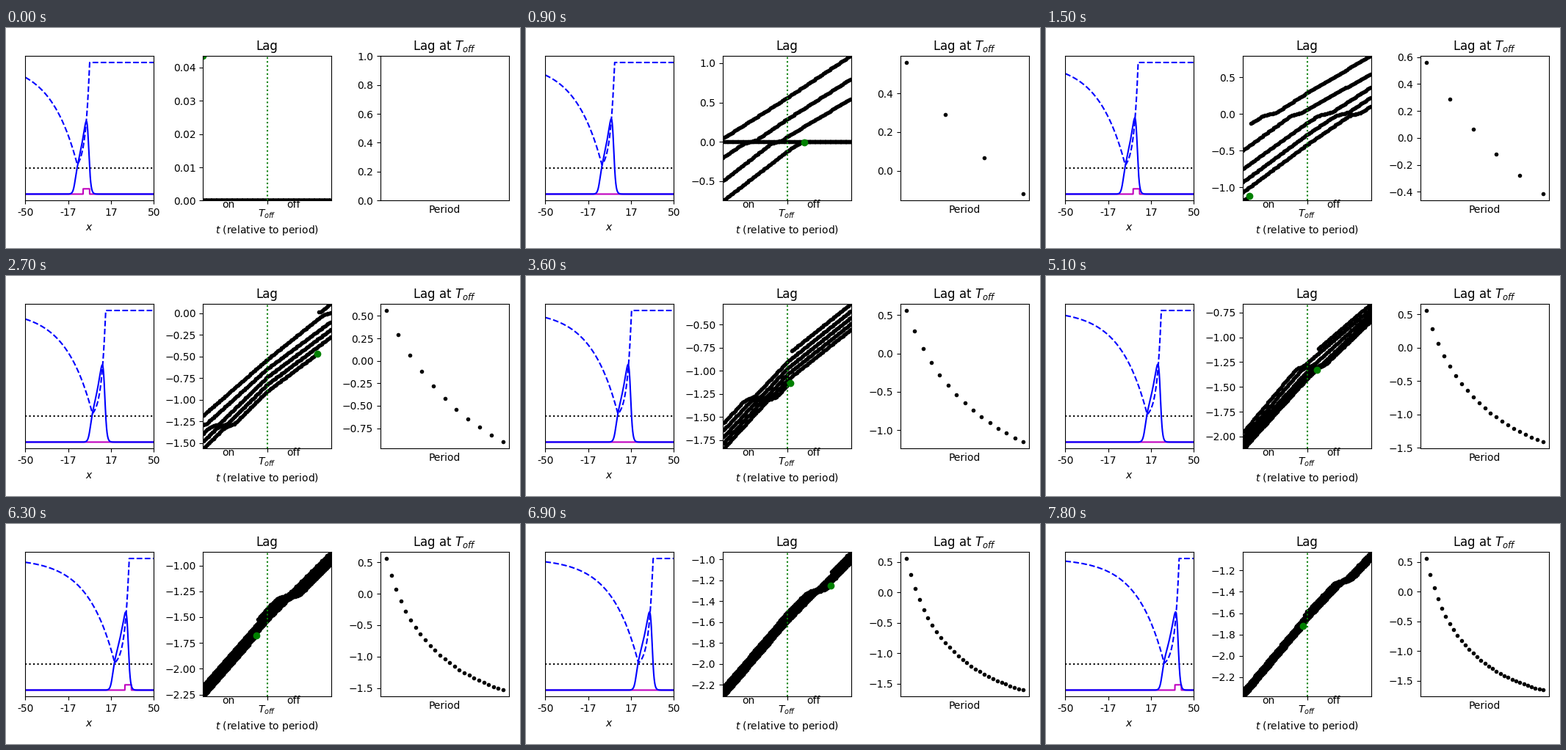
These frames come from a looping animation (700x300 px, 8 s). A matplotlib script:

```python
import numpy as np
import matplotlib.pyplot as plt
from matplotlib.animation import FuncAnimation

W, H = 700, 300
HOP = 1.3                  # stimulus advance per period
PERIODS_PER_STEP = 1.2103
DOTS_PER_PERIOD = 100
WINDOW = 5                 # periods of lag history shown


def lag_at_start(n):
    return -2.58 + 2.262 * np.exp(-n / 12.4) + .3615 * np.exp(-(n / 2.2) ** 2)


def lag_at_off(n):
    return -1.9 + 1.98 * np.exp(-n / 14.2) + .48 * np.exp(-n / 3)


# The front slows down briefly whenever it crosses a multiple of HOP.
path = np.arange(-1, 45, .002)
offset = (path + HOP / 2) % HOP - HOP / 2
effort = np.cumsum(1 + 2 * np.exp(-(offset / .02) ** 2)) * .002

periods = np.arange(32)
anchor_t = np.arange(64) / 2
anchor_lag = np.column_stack([lag_at_start(periods), lag_at_off(periods)]).ravel()
anchor_effort = np.interp(anchor_lag + HOP * np.floor(anchor_t), path, effort)


def front(t):
    return np.interp(np.interp(t, anchor_t, anchor_effort), effort, path)


def lag(t):
    return np.where(t < 0, 0, front(t) - HOP * np.floor(t))


def sigmoid(z):
    return 1 / (1 + np.exp(-np.clip(z, -50, 50)))


def pulse(z, t, width):
    peak = .617 * (1 + .07 * (1 - np.exp(-t / 6)))
    ramp = peak * np.exp(np.minimum(z + 2.6, 20) * .98 / (width - 2.6))
    return ramp * sigmoid((z + width + 1.95) / .93) * sigmoid(-(z + .93) / .77)


def resource(z, width):
    def active(s):
        return .18 + .82 * np.exp(np.minimum(s, 0) / 3.3)

    recovery = 1 - (1 - active(-width)) * np.exp(np.minimum(z + width, 0) / 21)
    return np.where(z < -width, recovery, active(z))


fig = plt.figure(figsize=(W / 100, H / 100), dpi=100)


def panel(left):
    return fig.add_axes([left / W, 64.55 / H, 175 / W, 197.4 / H])


wave_ax, lag_ax, off_ax = (panel(26.3 + 241.85 * i) for i in range(3))

x = np.linspace(-50, 50, 2001)
wave_ax.set(xlim=(-50, 50), ylim=(-.05, 1.05), xlabel="$x$", yticks=[])
ticks = np.linspace(-50, 50, 4)
wave_ax.set_xticks(ticks, [f"{tick:.0f}" for tick in ticks])
wave_ax.plot([-50, 50], [.2, .2], "k:")
stim_line, = wave_ax.plot([], [], "m-")
pulse_line, = wave_ax.plot([], [], "b-")
resource_line, = wave_ax.plot([], [], "b--")

lag_ax.set(xlim=(0, 1), title="Lag", xlabel="$t$ (relative to period)")
lag_ax.set_xticks([.5], ["$T_{off}$"])
for pos, word in ((.15, "on"), (.65, "off")):
    lag_ax.text(pos, -.05, word, transform=lag_ax.transAxes)
history, = lag_ax.plot([], [], "k.")
lag_ax.axvline(.5, color="g", ls=":")
now_dot, = lag_ax.plot([], [], "go")

off_ax.set(title="Lag at $T_{off}$", xlabel="Period", xticks=[])
off_dots, = off_ax.plot([], [], "k.")


def update(frame):
    t = frame // 3 * PERIODS_PER_STEP
    z = x - front(t)
    width = 9.6 + 2 * t / 31
    pulse_line.set_data(x, pulse(z, t, width))
    resource_line.set_data(x, resource(z, width))

    edge = HOP * np.floor(t)
    is_on = t % 1 < .5
    stim_line.set_data(x, np.where(is_on & (x >= edge - 5) & (x <= edge), .04, 0))

    past = t - np.arange(WINDOW * DOTS_PER_PERIOD) / DOTS_PER_PERIOD
    lags = lag(past)
    history.set_data(past % 1, lags)
    now_dot.set_data([t % 1], [lags[0]])
    lag_ax.set_ylim(lags.min(), lags.max())

    count = np.arange(int(t + .5))
    off_dots.set_data(count, lag(count + .5))
    if len(count):
        off_ax.relim()
        off_ax.autoscale()
    else:
        off_ax.set(xlim=(0, 1), ylim=(0, 1))


anim = FuncAnimation(fig, update, frames=80, interval=100, repeat=True,
                     repeat_delay=0, init_func=lambda: update(0))
plt.show()
```
